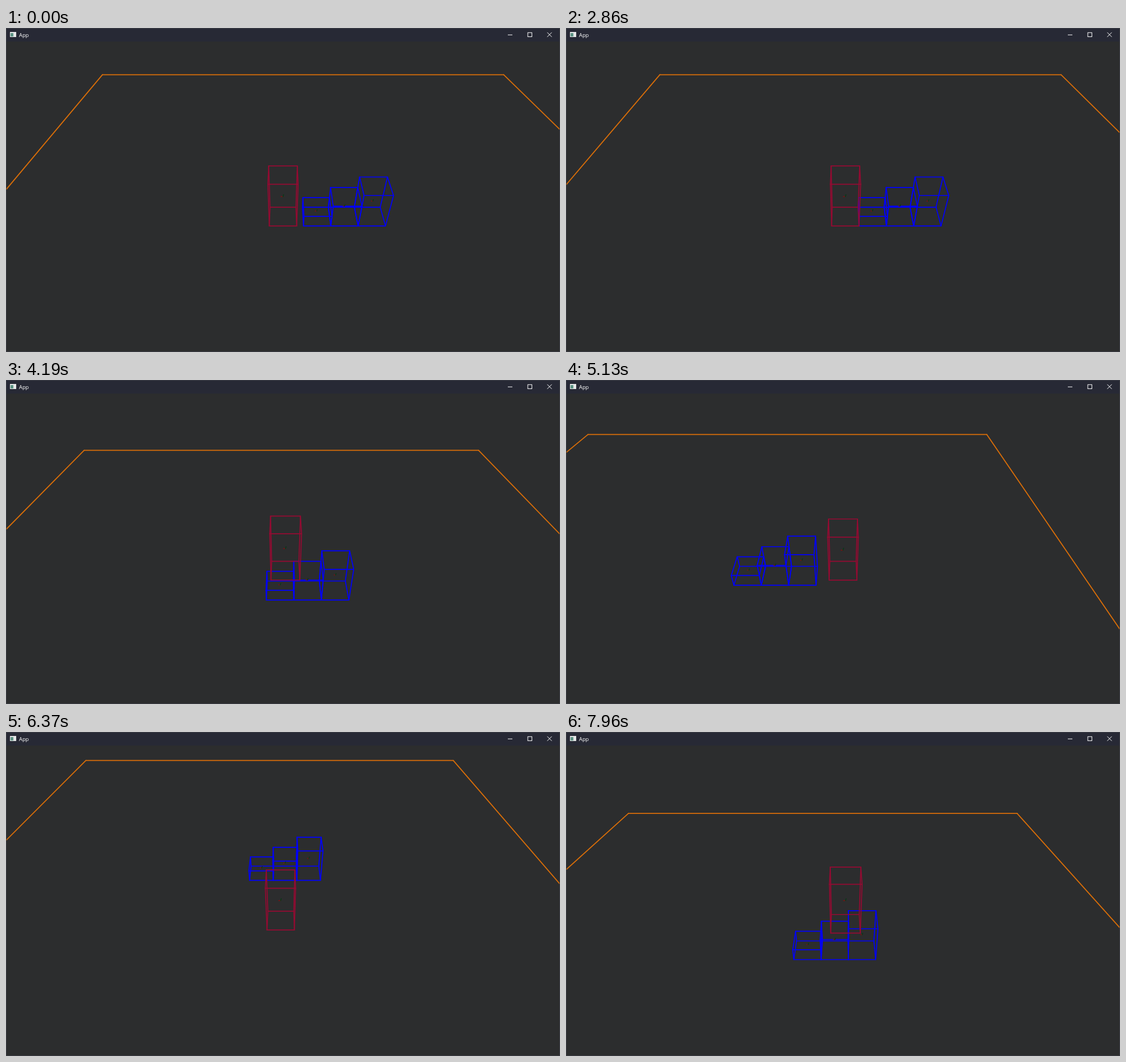
An HTML page with a canvas that plays this animation: 977x573 px, repeating every 8 s.

```html
<!DOCTYPE html>
<html lang="en">
<head>
<meta charset="utf-8">
<title>App</title>
<style>
  html, body { margin: 0; width: 100%; height: 100%; overflow: hidden; background: #2c2d2e; }
  canvas { display: block; width: 977px; height: 573px; }
</style>
</head>
<body>
<canvas id="stage" width="977" height="573"></canvas>
<script>
const ctx = document.getElementById('stage').getContext('2d');
const LOOP = 8000, STEP = 78.2, CAMERA_LAG = 14;
const CENTER_X = 488.5, CENTER_Y = 298.2, FOCAL = 662.7;
const GRAVITY = 11.15;
const ORANGE = '#da6e08', BLUE = '#0000ff', CRIMSON = '#960a32';

// Walking path as [ms, position] points, linear between them.
const pathX = [
  [2819, -1.25], [3432, 2.43], [3992, -0.93], [4003, -0.93], [4739, 3.485],
  [5936, 3.485], [6595, -0.465], [7048, -0.465], [7134, 0.05], [7192, -0.3],
  [7540, -0.3], [7585, -0.57], [7617, -0.57], [8000, 1.728]
];
const pathZ = [[5325, 0], [5808, 2.9], [6601, 2.9], [7048, 0.22]];
const blocks = [0, 1, 2].map(x => ({ x, height: 0.5 * (x + 1) }));

function along(path, t) {
  if (t <= path[0][0]) return path[0][1];
  for (let i = 1; i < path.length; i++) {
    const [t0, a] = path[i - 1], [t1, b] = path[i];
    if (t <= t1) return a + (b - a) * (t - t0) / (t1 - t0);
  }
  return path[path.length - 1][1];
}

function floorAt(x, z) {
  let top = 0;
  for (const b of blocks) {
    if (Math.abs(x - b.x) < 1 && Math.abs(z) < 1) top = Math.max(top, b.height);
  }
  return top;
}

// Feet height per millisecond: step up at once, fall under gravity.
const feet = [];
for (let t = 0, y = 0, speed = 0; t <= LOOP; t++) {
  speed += GRAVITY / 1000;
  y -= speed / 1000;
  const floor = floorAt(along(pathX, t), along(pathZ, t));
  if (y <= floor) { y = floor; speed = 0; }
  feet.push(y);
}

function playerAt(t) {
  const ms = Math.min(LOOP, Math.max(0, t));
  return { x: along(pathX, ms), y: feet[Math.round(ms)], z: along(pathZ, ms) };
}

function makeCamera(target) {
  const rise = 9 - target.y, dist = Math.hypot(rise, 10);
  const sin = rise / dist, cos = 10 / dist;
  return (x, y, z) => {
    const dx = x - target.x, dy = y - 10, dz = z - target.z - 10;
    const scale = FOCAL / -(dy * sin + dz * cos);
    return [CENTER_X + dx * scale, CENTER_Y - (dy * cos - dz * sin) * scale];
  };
}

function line(a, b) {
  ctx.beginPath();
  ctx.moveTo(a[0], a[1]);
  ctx.lineTo(b[0], b[1]);
  ctx.stroke();
}

function drawBox(project, x, y, z, height, color) {
  ctx.strokeStyle = color;
  const corner = i => project(
    x + (i & 1 ? 0.5 : -0.5), y + (i & 2 ? height : 0), z + (i & 4 ? 0.5 : -0.5));
  for (let i = 0; i < 8; i++) {
    for (const bit of [1, 2, 4]) if (!(i & bit)) line(corner(i), corner(i | bit));
  }
}

function drawAxes(project, x, y, z, size) {
  const [px, py] = project(x, y, z);
  ctx.lineWidth = 1.6;
  ctx.strokeStyle = '#7a1212';
  line([px - size, py], [px, py]);
  ctx.strokeStyle = '#0a3a18';
  line([px, py], [px + 1, py - size]);
}

function drawWindow() {
  ctx.fillStyle = '#272935';
  ctx.fillRect(0, 0, 977, 24);
  ctx.strokeStyle = '#3c3e46';
  ctx.lineWidth = 1;
  ctx.strokeRect(0.5, 0.5, 976, 572);

  ctx.fillStyle = '#e4e6e6';
  ctx.fillRect(7, 7, 11, 9);
  ctx.fillStyle = '#5c9484';
  ctx.fillRect(8, 9, 5, 6);

  ctx.fillStyle = '#fff';
  ctx.font = '9.3px "Open Sans", "Noto Sans", sans-serif';
  ctx.fillText('App', 23, 15.7);

  ctx.strokeStyle = '#fff';
  line([885, 12.2], [893, 12.2]);
  ctx.strokeRect(920.2, 8.2, 7.2, 7.2);
  line([954.5, 7.8], [962.5, 15.8]);
  line([962.5, 7.8], [954.5, 15.8]);
}

function draw(t) {
  const time = t < 2850 ? 0 : 2860 + Math.floor((t - 2850) / STEP) * STEP;
  const player = playerAt(time);
  const project = makeCamera(playerAt(time - CAMERA_LAG));

  ctx.fillStyle = '#2c2d2e';
  ctx.fillRect(0, 0, 977, 573);

  ctx.save();
  ctx.beginPath();
  ctx.rect(1, 24, 975, 548);
  ctx.clip();
  ctx.lineJoin = ctx.lineCap = 'round';

  ctx.lineWidth = 1.8;
  ctx.strokeStyle = ORANGE;
  const ground = [[-1, -1], [1, -1], [1, 1], [-1, 1]].map(([x, z]) => project(12.5 * x, 0, 12.5 * z));
  ground.forEach((p, i) => line(p, ground[(i + 1) % 4]));

  for (const b of blocks) {
    ctx.lineWidth = 1.7;
    drawBox(project, b.x, 0, 0, b.height, BLUE);
    drawAxes(project, b.x, b.height / 2 + 0.03, 0, 2.5);
  }
  ctx.lineWidth = 1.7;
  drawBox(project, player.x, player.y, player.z, 2, CRIMSON);
  drawAxes(project, player.x, player.y + 1, player.z, 3.5);
  ctx.restore();

  drawWindow();
}

const start = performance.now();
function tick() {
  draw((performance.now() - start) % LOOP);
  requestAnimationFrame(tick);
}
tick();
</script>
</body>
</html>
```
